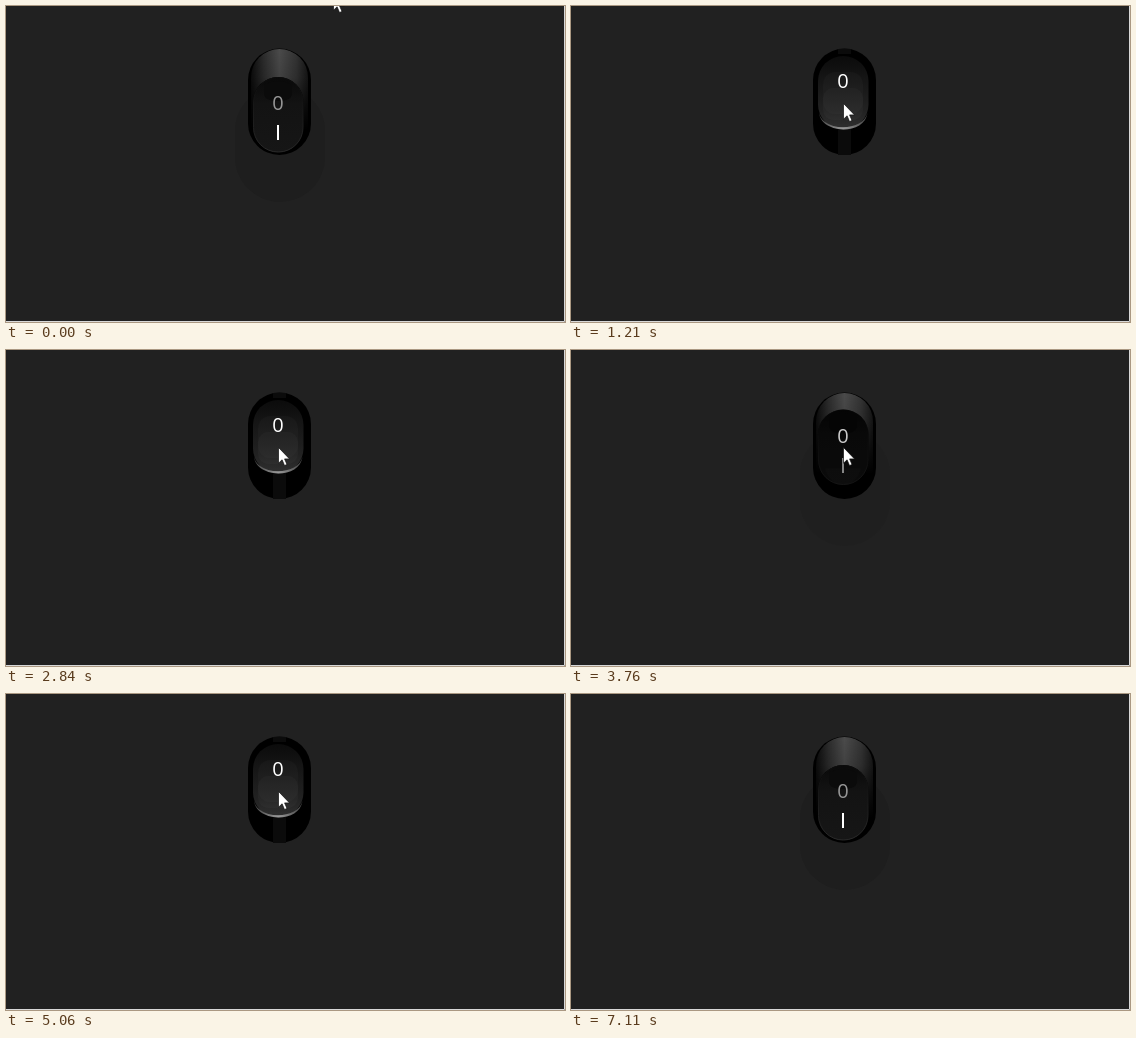
These frames come from a looping animation (559 px wide and 316 px high, 7.64 s). An HTML page:

```html
<!DOCTYPE html>
<html lang="en">
<head>
<meta charset="utf-8">
<title>Rocker switch</title>
<style>
html, body { margin: 0; width: 100%; height: 100%; overflow: hidden; background: #212121; }
svg { display: block; width: 100%; height: 100%; }
text { font: 20px "Open Sans", "Noto Sans", sans-serif; text-anchor: middle; }
</style>
</head>
<body>
<svg viewBox="0 0 559 316">
  <defs>
    <linearGradient id="capFill">
      <stop offset="0" stop-color="#0c0c0c"/>
      <stop offset=".22" stop-color="#2c2c2c"/>
      <stop offset=".5" stop-color="#4b4b4b"/>
      <stop offset=".8" stop-color="#333"/>
      <stop offset="1" stop-color="#161616"/>
    </linearGradient>
    <linearGradient id="capFade" gradientUnits="userSpaceOnUse" x1="0" y1="43" x2="0" y2="124">
      <stop offset="0" stop-color="#fff"/>
      <stop offset=".35" stop-color="#ddd"/>
      <stop offset="1" stop-color="#000"/>
    </linearGradient>
    <mask id="capMask"><rect x="240" y="40" width="70" height="112" fill="url(#capFade)"/></mask>
    <linearGradient id="darkFill" x2="0" y2="1">
      <stop offset="0" stop-color="#090909"/>
      <stop offset=".35" stop-color="#131313"/>
      <stop offset="1" stop-color="#161616"/>
    </linearGradient>
    <linearGradient id="darkRim" x2="0" y2="1">
      <stop offset="0" stop-color="#0c0c0c"/>
      <stop offset=".6" stop-color="#1d1d1d"/>
      <stop offset="1" stop-color="#2a2a2a"/>
    </linearGradient>
    <linearGradient id="litFill" x2="0" y2="1">
      <stop offset="0" stop-color="#0b0b0b"/>
      <stop offset=".3" stop-color="#151515"/>
      <stop offset=".75" stop-color="#222"/>
      <stop offset="1" stop-color="#303030"/>
    </linearGradient>
    <linearGradient id="glow">
      <stop offset="0" stop-color="#444"/>
      <stop offset=".5" stop-color="#999"/>
      <stop offset="1" stop-color="#444"/>
    </linearGradient>
  </defs>

  <rect width="559" height="316" fill="#212121"/>
  <path d="M558.5 0V315.5H0" fill="none" stroke="#d8d8d8"/>
  <rect id="shadow" x="229" y="80" width="90" height="116" rx="45" fill="#1e1e1e"/>

  <rect x="242" y="42.5" width="63" height="106.5" rx="31.5" fill="#000"/>
  <g id="well" fill="#0b0b0b">
    <rect x="267" y="43" width="13" height="5"/>
    <rect x="267" y="123" width="13" height="26"/>
  </g>
  <g id="cap" mask="url(#capMask)">
    <rect x="245" y="43" width="57" height="104" rx="28.5" fill="url(#capFill)"/>
  </g>

  <g id="face">
    <rect x="247" y="48" width="50.5" height="75.5" rx="25" fill="#000"/>
    <path id="patch" d="M254 107H290Q285 123 272 123T254 107Z" fill="#0d0d0d"/>
    <g id="dark">
      <rect x="247.5" y="48.5" width="49.5" height="74.5" rx="24.5" fill="url(#darkFill)" stroke="url(#darkRim)"/>
      <path d="M258 56Q272 48 286 56V66Q284 72 272 72T258 66Z" fill="#0b0b0b"/>
    </g>
    <g id="lit">
      <rect x="247" y="50" width="50.5" height="73.5" rx="25" fill="url(#litFill)"/>
      <rect x="252" y="66" width="40" height="42" rx="12" fill="#fff" opacity=".02"/>
      <rect x="252" y="82" width="40" height="32" rx="10" fill="#fff" opacity=".025"/>
      <path d="M248 107C252 126 292 126 296.500 107C294 129 251 129 248 107Z" fill="url(#glow)"/>
    </g>
  </g>
  <text id="zero" x="272" y="82">0</text>
  <rect id="bar" x="271" y="119" width="2" height="15" fill="#fff"/>

  <path id="cursor" d="M.5 .5V16.200L4.100 12.800L6.500 18.500L9 17.500L6.600 11.900H11.500Z" fill="#fff" stroke="#111" stroke-width=".7"/>
</svg>
<script>
const LOOP = 7640;
const $ = id => document.getElementById(id);

// down: face travel, cap: upper body light, lit: glow of the raised face
const pose = (down, cap, lit) => ({ down, cap, lit });
const OFF = pose(1, 1, 0);
const ON = pose(0, 0, 1);
const RELEASE = pose(0, 1, 0);
const PRESS = pose(.6, .35, .1);
const RISE = pose(.15, 0, .55);
const SINK = pose(.5, 1, 0);
const SETTLE = pose(.93, 1, 0);

const poses = [
  [0, OFF], [970, PRESS], [1090, RISE], [1210, ON],
  [1770, RELEASE], [1920, OFF], [2720, RISE], [2840, ON],
  [3760, SINK], [3910, SETTLE], [4060, OFF], [4910, RISE], [5060, ON],
  [6580, RELEASE], [6710, SETTLE], [6830, OFF]
];
const pointer = [
  [0, [327, -12]], [270, [327, 0]], [420, [279, 138]], [570, [277, 130]],
  [720, [272, 97]], [6830, [435, 184]], [6960, [400, 173]], [7110, null]
];

const at = (keys, t) => keys.filter(([start]) => start <= t).pop()[1];
const fade = (id, value) => $(id).setAttribute("opacity", value);
const move = (id, x, y) => $(id).setAttribute("transform", `translate(${x} ${y})`);

function draw(t) {
  const { down, cap, lit } = at(poses, t);
  const spot = at(pointer, t);
  const grey = Math.round(255 - 105 * down);
  fade("shadow", down);
  fade("cap", cap);
  fade("well", lit);
  fade("dark", down);
  fade("patch", 1 - down);
  fade("lit", lit);
  fade("bar", down);
  move("face", 0, 23 * down);
  move("zero", 0, 22 * down);
  move("bar", 0, 22 * (down - 1));
  $("zero").setAttribute("fill", `rgb(${grey},${grey},${grey})`);
  fade("cursor", spot ? 1 : 0);
  if (spot) move("cursor", ...spot);
}

const start = performance.now();
function tick() {
  draw((performance.now() - start) % LOOP);
  requestAnimationFrame(tick);
}
tick();
</script>
</body>
</html>
```
